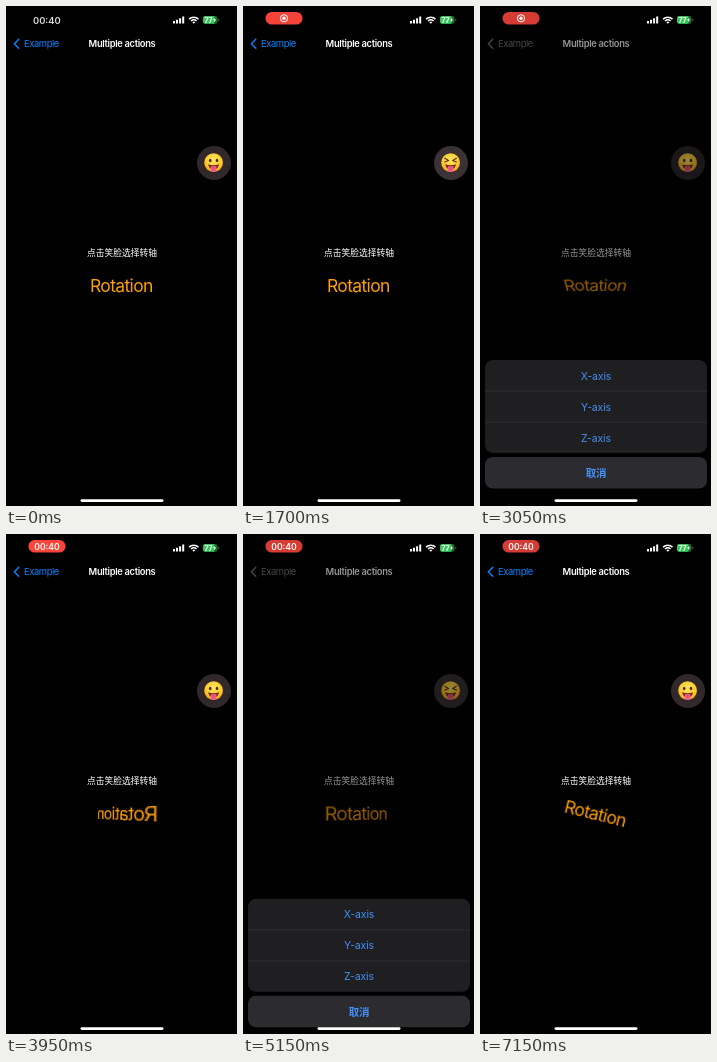
These frames come from a looping animation (231 px wide and 500 px high, 7200 ms). An HTML page:

```html
<!DOCTYPE html>
<html lang="en">
<head>
<meta charset="utf-8">
<title>Multiple actions</title>
<style>
  html, body { margin: 0; width: 100%; height: 100%; overflow: hidden; background: #000; }
  #stage { position: relative; width: 231px; height: 500px; overflow: hidden; background: #000; }
  svg { position: absolute; left: 0; top: 0; display: block; }
  text { font-family: Inter, Roboto, sans-serif; }
  .mid { text-anchor: middle; }
  .cjk { font-family: "Noto Sans CJK SC", "Noto Sans CJK", "Noto Sans", sans-serif; }
  .nav { font-size: 9.4px; }
  .choice { font-size: 10.5px; letter-spacing: -.15px; fill: #4390f5; }
  #word {
    position: absolute; left: 84px; top: 268px; width: 64px; height: 23px;
    font: 400 17.5px/23px Inter, Roboto, sans-serif; letter-spacing: -.65px;
    white-space: nowrap; color: #ff9f0a;
  }
</style>
</head>
<body>
<div id="stage">
  <svg width="231" height="500">
    <g id="back" fill="#0a84ff" stroke="#0a84ff">
      <path d="M12.8 33.2 8.3 37.7l4.5 4.6" fill="none" stroke-width="1.4" stroke-linecap="round" stroke-linejoin="round"/>
      <text class="nav" x="18" y="41.2" letter-spacing="-.4" stroke="none">Example</text>
    </g>
    <text class="nav mid" x="116" y="41.2" font-weight="600" letter-spacing="-.33" fill="#fff">Multiple actions</text>

    <circle id="button" cx="208" cy="157" r="17" fill="#30282b"/>
    <g transform="translate(207.6 156.7)">
      <radialGradient id="skin" cx=".5" cy=".35" r=".65">
        <stop offset="0" stop-color="#ffe75e"/>
        <stop offset=".65" stop-color="#fdc92f"/>
        <stop offset="1" stop-color="#ee9a1c"/>
      </radialGradient>
      <circle r="9.4" fill="url(#skin)"/>
      <path d="M-5.4 1.6Q0 3.3 5.4 1.6 4.8 6.6 0 6.8-4.8 6.6-5.4 1.6Z" fill="#6b2f12"/>
      <path d="M-2.8 3.6Q0 2.8 2.8 3.6V6.6a2.8 2.8 0 0 1-5.6 0Z" fill="#f2588a"/>
      <path d="M0 3.6V6.8" stroke="#c93468" stroke-width=".6"/>
      <g id="open" fill="#5a2c10">
        <ellipse cx="-3.4" cy="-2.2" rx="1.3" ry="1.8"/>
        <ellipse cx="3.4" cy="-2.2" rx="1.3" ry="1.8"/>
      </g>
      <path id="shut" d="M-5.8-4.4-2-2.2-5.8-.6M5.8-4.4 2-2.2 5.8-.6" fill="none" stroke="#5a2c10" stroke-width="1.1" stroke-linecap="round" stroke-linejoin="round"/>
    </g>

    <text class="cjk mid" x="116" y="250.3" font-size="8.75" fill="#fff">点击笑脸选择转轴</text>
  </svg>

  <div id="word">Rotation</div>

  <svg width="231" height="500">
    <rect id="dim" width="231" height="500" fill="#000"/>

    <g id="sheet">
      <rect x="5" y="354" width="222" height="93" rx="8" fill="#1f1e21"/>
      <path d="M5 385.2H227M5 416.2H227" stroke="#353438" stroke-width=".7"/>
      <text class="choice mid" x="116" y="373.6">X-axis</text>
      <text class="choice mid" x="116" y="404.6">Y-axis</text>
      <text class="choice mid" x="116" y="435.6">Z-axis</text>
      <rect x="5" y="451" width="222" height="31.5" rx="8" fill="#2c2b2f"/>
      <text class="choice cjk mid" x="116" y="470.8" font-weight="700">取消</text>
    </g>

    <text id="clock" x="27" y="17.6" font-size="9.4" font-weight="600" fill="#dcdcdc">00:40</text>
    <g id="pill">
      <rect id="pillBox" x="22.5" y="6" width="37" height="12.6" rx="6.3"/>
      <g id="record" fill="none" stroke="#fff">
        <circle cx="41" cy="12.3" r="3.6" stroke-width="1"/>
        <circle cx="41" cy="12.3" r="1.7" fill="#fff" stroke="none"/>
      </g>
      <text id="pillTime" class="mid" x="41" y="15.5" font-size="8.6" font-weight="600" fill="#fff">00:40</text>
    </g>

    <g fill="#fff">
      <path d="M167 15h2v2.5h-2zM170 13.7h2v3.8h-2zM173.1 12.2h2v5.3h-2zM176.2 10.6h2v6.9h-2z"/>
      <g fill="none" stroke="#fff" stroke-width="1.5">
        <path d="M183.1 13.1a6.9 6.9 0 0 1 9.4 0"/>
        <path d="M185 15a4.2 4.2 0 0 1 5.6 0"/>
      </g>
      <path d="M186.3 16.2a2.2 2.2 0 0 1 3 0l-1.5 1.6Z"/>
    </g>
    <rect x="197" y="10" width="14.6" height="7.8" rx="2.4" fill="#22662f"/>
    <path d="M199.4 10H208.3V17.8H199.4A2.4 2.4 0 0 1 197 15.4V12.4A2.4 2.4 0 0 1 199.4 10Z" fill="#34c759"/>
    <rect x="212.2" y="12.5" width="1.1" height="2.8" rx=".5" fill="#22662f"/>
    <text x="198.4" y="16.5" font-size="7" font-weight="700" letter-spacing="-.2" fill="#fff">77</text>
    <path d="M209.3 11.4 207 14.3h1.5l-.6 2.2 2.4-2.9h-1.5Z" fill="#fff"/>

    <rect x="74.5" y="493.2" width="83" height="2.8" rx="1.4" fill="#fff"/>
  </svg>
</div>

<script>
  const LOOP = 7200, STEP = 50;
  const RISE = 200, FALL = 170, TRAVEL = 146;
  // [start of rise, start of fall] for each showing of the sheet
  const sheets = [[830, 1400], [1735, 1975], [2750, 3650], [5034, 5710]];
  const spins = { X: 2135, Y: 3816, Z: 5880 };

  const el = id => document.getElementById(id);
  const clamp = v => Math.min(1, Math.max(0, v));
  const show = (id, on) => el(id).setAttribute('opacity', +on);
  const mix = (a, b, k) => `rgb(${a.map((v, i) => Math.round(v + (b[i] - v) * k))})`;

  // Underdamped spring: one full turn, with overshoot
  function turn(ms) {
    if (ms <= 0) return 0;
    const u = ms * .0078;
    return 360 * (1 - Math.exp(-u / 3) * (Math.cos(u) + Math.sin(u) / 3));
  }

  function sheetState(t) {
    let up = 0, dim = 0, pressed = false;
    for (const [rise, fall] of sheets) {
      if (t >= rise - 130 && t < rise + RISE) pressed = true;
      if (t < rise || t >= fall + FALL) continue;
      const a = clamp((t - rise) / RISE), b = clamp((t - fall) / FALL);
      up = 1 - (1 - a) ** 3 - b * b * (3 - 2 * b);
      dim = clamp(a * 2) * (1 - b);
    }
    return { up, dim, pressed };
  }

  function draw(t) {
    const { up, dim, pressed } = sheetState(t);
    el('sheet').setAttribute('transform', `translate(0 ${(1 - up) * TRAVEL})`);
    show('sheet', up > 0);
    el('dim').setAttribute('opacity', dim * .42);
    const tint = mix([10, 132, 255], [122, 122, 122], dim);
    el('back').setAttribute('fill', tint);
    el('back').setAttribute('stroke', tint);

    show('open', !pressed);
    show('shut', pressed);
    el('button').setAttribute('fill', pressed ? '#3a3235' : '#30282b');

    const turns = Object.keys(spins).map(axis => `rotate${axis}(${turn(t - spins[axis])}deg)`);
    el('word').style.transform = 'perspective(64px) ' + turns.join(' ');

    const grow = clamp(t / 250);
    show('clock', grow < .5);
    el('pill').setAttribute('opacity', grow);
    el('pill').setAttribute('transform', `translate(41 12.3) scale(${.6 + .4 * grow}) translate(-41 -12.3)`);
    show('record', t < 3400);
    show('pillTime', t >= 3400);
    const glow = .5 + .5 * Math.cos((t - 3075) / 2050 * 2 * Math.PI);
    el('pillBox').setAttribute('fill', mix([255, 69, 58], [214, 60, 51], glow));
  }

  const begin = performance.now();
  function tick() {
    const t = (performance.now() - begin) % LOOP;
    draw(Math.floor(t / STEP) * STEP);
    requestAnimationFrame(tick);
  }
  tick();
</script>
</body>
</html>
```
